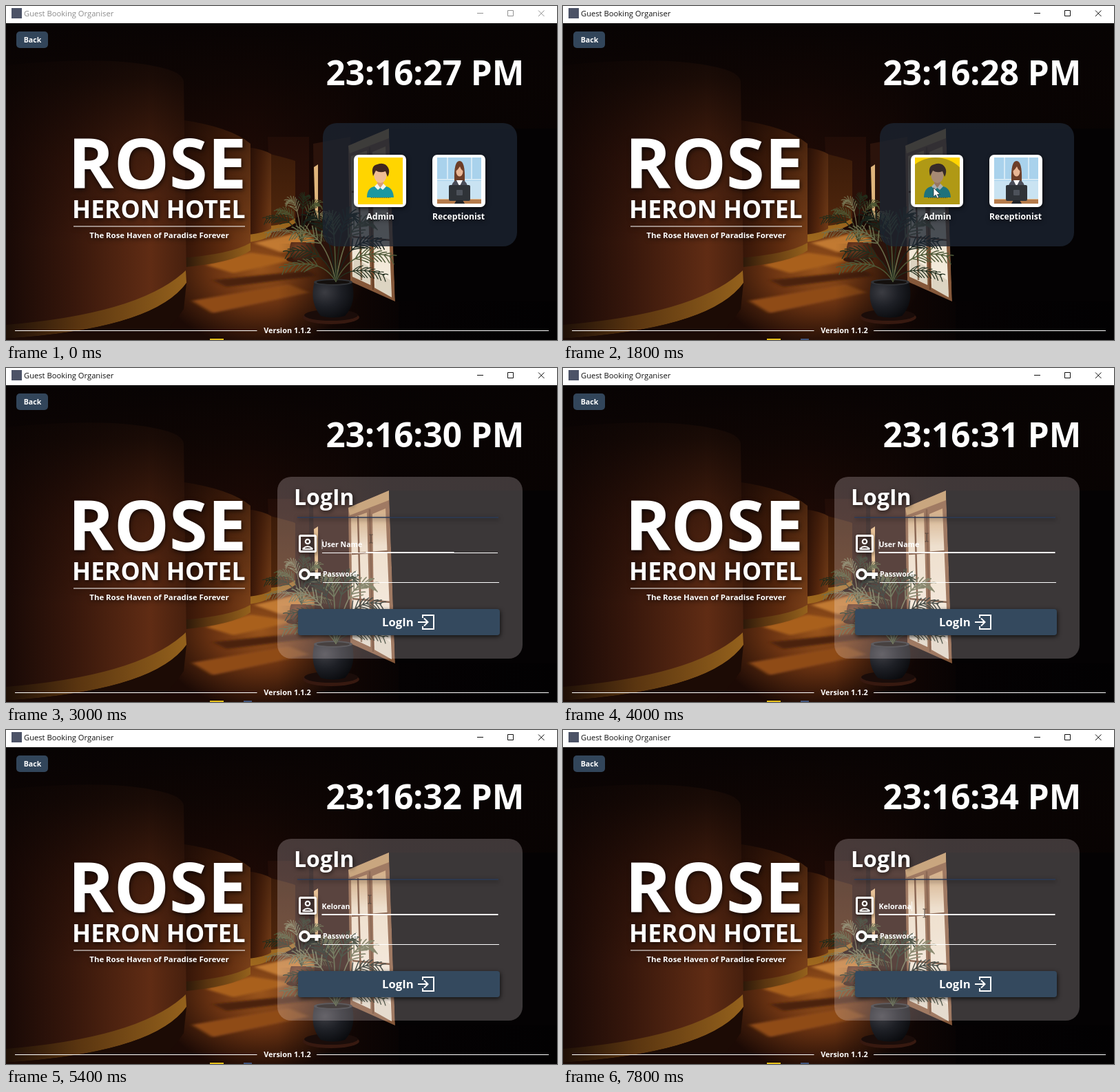
Recreate the animation shown at these times as an HTML page. Size 800 by 485 pixels, loop 8000 ms.

```html
<!DOCTYPE html>
<html lang="en">
<head>
<meta charset="utf-8">
<title>Guest Booking Organiser</title>
<style>
  html, body { margin: 0; width: 100%; height: 100%; overflow: hidden; background: #050203; }
  svg { display: block; width: 100vw; height: 100vh; }
  text { font-family: "Open Sans", "Noto Sans", sans-serif; font-weight: 700; fill: #fff; white-space: pre; }
  .mid { text-anchor: middle; }
  .drop { filter: drop-shadow(1px 2px 3px rgba(0, 0, 0, .7)); }
  .rule { stroke: #fff; fill: none; }
</style>
</head>
<body>
<svg viewBox="0 0 800 485" preserveAspectRatio="none">
  <defs>
    <linearGradient id="room" x2="1" y2="0">
      <stop offset="0" stop-color="#0e0504"/><stop offset=".45" stop-color="#240c06"/>
      <stop offset=".6" stop-color="#160805"/><stop offset=".7" stop-color="#050203"/><stop offset="1" stop-color="#020102"/>
    </linearGradient>
    <linearGradient id="drum" x2="1" y2="0">
      <stop offset="0" stop-color="#180906"/><stop offset=".35" stop-color="#35160b"/>
      <stop offset=".8" stop-color="#602c14"/><stop offset="1" stop-color="#47200e"/>
    </linearGradient>
    <linearGradient id="bay" x2="1" y2="0">
      <stop offset="0" stop-color="#2f1207"/><stop offset=".6" stop-color="#5c2a0e"/><stop offset="1" stop-color="#7a4019"/>
    </linearGradient>
    <linearGradient id="band" x2="1" y2="0">
      <stop offset="0" stop-color="#1f1007"/><stop offset=".4" stop-color="#5a3510"/><stop offset="1" stop-color="#94611c"/>
    </linearGradient>
    <linearGradient id="shade" x2="0" y2="1">
      <stop offset="0" stop-color="#070303" stop-opacity=".96"/><stop offset=".2" stop-color="#0a0403" stop-opacity=".8"/>
      <stop offset=".5" stop-color="#100503" stop-opacity=".35"/><stop offset=".8" stop-color="#100503" stop-opacity="0"/>
    </linearGradient>
    <radialGradient id="glow" gradientUnits="userSpaceOnUse" cx="370" cy="380" r="155" gradientTransform="matrix(1 0 0 .75 0 95)">
      <stop offset="0" stop-color="#9a551c"/><stop offset=".45" stop-color="#6b3312"/><stop offset="1" stop-color="#1c0a05"/>
    </radialGradient>
    <linearGradient id="dusk" x2="1" y2="0">
      <stop offset="0" stop-color="#050203" stop-opacity="0"/><stop offset="1" stop-color="#050203"/>
    </linearGradient>
    <radialGradient id="pot" cx=".3" cy=".3" r=".8">
      <stop offset="0" stop-color="#3b3c42"/><stop offset=".5" stop-color="#1d1f25"/><stop offset="1" stop-color="#090a0d"/>
    </radialGradient>
    <radialGradient id="clay" cx=".35" cy=".3" r=".8">
      <stop offset="0" stop-color="#7c4425"/><stop offset="1" stop-color="#2e130b"/>
    </radialGradient>
    <linearGradient id="pane" x2="0" y2="1">
      <stop offset="0" stop-color="#c79b68"/><stop offset=".25" stop-color="#e9dac2"/><stop offset="1" stop-color="#f6efe2"/>
    </linearGradient>
    <filter id="soft" x="-20%" y="-80%" width="140%" height="260%"><feGaussianBlur stdDeviation="3 1.500"/></filter>
    <clipPath id="face"><rect x="511" y="220" width="65" height="68"/></clipPath>
  </defs>

  <g id="photo">
    <rect y="25" width="800" height="460" fill="url(#room)"/>
    <path d="M240 325H470L570 430V485H60Z" fill="url(#glow)"/>
    <g filter="url(#soft)">
      <path d="M360 344L428 328L452 342L400 358Z" fill="#c27a30"/>
      <path d="M290 376L355 358L420 368L330 388Z" fill="#a9601f"/>
      <path d="M270 428L410 404L440 416L300 446Z" fill="#8f4c19"/>
      <path d="M300 398L440 384L450 392L320 408Z" fill="#4b210c"/>
    </g>
    <path d="M380 190H440V300L385 322Z" fill="#32130a"/>
    <path d="M384 215Q412 222 420 225V308Q405 318 384 319Z" fill="#55290d"/>
    <path d="M384 319Q407 317 420 308V315Q405 326 384 328Z" fill="#a56d20"/>
    <path d="M350 205Q374 208 385 215V325Q374 334 350 337Z" fill="url(#bay)"/>
    <path d="M350 332Q375 330 385 323V332Q375 341 350 343Z" fill="#a0691e"/>
    <path d="M252 165Q325 175 355 200V345Q325 364 252 370Z" fill="url(#bay)"/>
    <path d="M252 366Q325 361 355 344V355Q330 373 252 380Z" fill="url(#band)"/>
    <path d="M0 86Q160 70 235 92Q257 99 258 110L262 392Q225 455 0 474Z" fill="url(#drum)"/>
    <path d="M0 463Q195 447 261 384L262 402Q215 469 0 483Z" fill="url(#band)"/>
    <path d="M0 483Q215 469 262 402L258 440Q235 475 215 485H0Z" fill="#1c0b05"/>
    <rect y="25" width="800" height="400" fill="url(#shade)"/>
    <rect x="395" y="345" width="200" height="140" fill="url(#dusk)"/>
    <path d="M446 200L500 190V425L448 350Z" fill="#2b130b"/>
    <path d="M447 234L453 230V310L449 305Z" fill="#e0b57c"/>
    <path d="M497 203L556 178L565 429L500 400Z" fill="#85583a"/>
    <path d="M497 203L556 178V192L499 214Z" fill="#b9905d"/>
    <path d="M501 218L524 210L529 405L503 393Z" fill="url(#pane)"/>
    <path d="M532 212L551 204L560 423L535 409Z" fill="url(#pane)"/>
    <path d="M511 215L516 398M528 205L533 412M502 270L555 266M503 335L558 340" stroke="#6b4228" stroke-width="2.500" fill="none"/>
    <path d="M505 365L530 380V405L503 393ZM537 385L558 398L560 423L535 409Z" fill="#b9b096" opacity=".4"/>
    <path d="M556 178L565 429H800V178Z" fill="#040203"/>
    <ellipse cx="429" cy="368" rx="22" ry="5" fill="#35180c"/>
    <ellipse cx="472" cy="452" rx="41" ry="10" fill="#371910"/>
    <ellipse cx="472" cy="449" rx="39" ry="8" fill="#1a0c09"/>
    <path d="M414 343H443Q450 360 438 369Q428 372 418 369Q408 357 414 343Z" fill="url(#clay)"/>
    <path d="M448 400H502Q510 431 492 450Q475 455 457 450Q440 430 448 400Z" fill="url(#pot)"/>
    <ellipse cx="475" cy="401" rx="28" ry="5" fill="#303236"/>
    <ellipse cx="475" cy="401" rx="24" ry="3" fill="#130f0d"/>
    <g id="plants" fill="none" stroke-linecap="round"></g>
  </g>

  <g id="frame">
    <rect width="800" height="25" fill="#fff"/>
    <rect x="8" y="3" width="15" height="15" fill="#4c5367"/>
    <text id="title" x="26" y="15" font-size="11.200" style="font-weight:400">Guest Booking Organiser</text>
    <path id="controls" d="M684 10.500H693M728.500 6.500H736.500V14.500H728.500ZM773 6.500L781.500 15M781.500 6.500L773 15" fill="none"/>
    <rect x="296" y="483" width="20" height="2" fill="#e3bd19"/>
    <rect id="task" x="345" y="483" width="12" height="2" fill="#40537a"/>
  </g>

  <g id="brand" class="drop">
    <text x="90" y="265" font-size="101">ROSE</text>
    <text x="96" y="308" font-size="35.500">HERON HOTEL</text>
    <path class="rule" d="M98 320H347"/>
    <text class="mid" x="222.500" y="337" font-size="11.400">The Rose Haven of Paradise Forever</text>
  </g>
  <path class="rule" d="M13 471.500H364.500M451 471.500H788"/>
  <text class="mid" x="408.500" y="475" font-size="10.900">Version 1.1.2</text>
  <rect id="back" x="15" y="37" width="46" height="24" rx="5"/>
  <text class="mid" x="38.500" y="53" font-size="10.600">Back</text>
  <text id="clock" x="464.500" y="115" font-size="49.400"></text>

  <g id="choose">
    <rect x="460" y="170" width="282" height="179" rx="20" fill="#1c2531" fill-opacity=".78"/>
    <g class="drop">
      <rect x="505" y="216" width="76" height="76" rx="7" fill="#fff"/>
      <rect x="619" y="216" width="77" height="76" rx="7" fill="#fff"/>
    </g>
    <g clip-path="url(#face)">
      <rect x="511" y="220" width="65" height="68" fill="#ffd500"/>
      <path d="M524 278Q524 264 535 262L543 260L552 262Q562 264 563 278Z" fill="#1c98a0"/>
      <path d="M539 253H548V261Q543 267 539 261Z" fill="#d99d76"/>
      <path d="M535 262L539 258L543.500 264L548 258L552 262L547 267L543.500 264L540 267Z" fill="#f2f4f2"/>
      <ellipse cx="543.500" cy="246" rx="9" ry="11" fill="#efbd95"/>
      <path d="M533 247Q529 232 539 230Q550 226 555 235Q558 241 554 248L551 240Q543 243 537 239Z" fill="#40271e"/>
      <path d="M530 278.500H558" stroke="#836f18" stroke-dasharray="2 1"/>
      <circle id="ripple" cx="541" cy="270" fill="#26303a" fill-opacity=".36"/>
    </g>
    <rect x="626" y="220" width="64" height="67" fill="#a9d2ec"/>
    <path d="M626 254H690V280H626Z" fill="#c9e3f2"/>
    <path d="M626 252H690M641 220V252M676 220V252" stroke="#d5eaf6" stroke-width="2"/>
    <path d="M651 254Q650 225 658.500 225Q667 225 666 254Z" fill="#6d3e28"/>
    <path d="M645 280Q644 257 653 253H664Q673 257 672 280Z" fill="#4a4d58"/>
    <path d="M654 253H663L658.500 262Z" fill="#fff"/>
    <ellipse cx="658.500" cy="240" rx="5" ry="7.500" fill="#e9b694"/>
    <path d="M653 240Q654 229 660 230Q664 232 664 240Q660 237 659 233Q656 238 653 240Z" fill="#6d3e28"/>
    <path d="M626 281H690V287H626Z" fill="#b57b4b"/>
    <path d="M626 280.500H690" stroke="#e4c29b"/>
    <rect x="643" y="260" width="31" height="23" rx="2" fill="#2f3338"/>
    <path d="M654 282H663L666 287H651Z" fill="#24272c"/>
    <rect x="654" y="267" width="9" height="8" rx="1" fill="#4d525a"/>
    <g class="drop">
      <text class="mid" x="543.500" y="310" font-size="12.400">Admin</text>
      <text class="mid" x="657" y="310" font-size="12.200">Receptionist</text>
    </g>
  </g>

  <g id="login">
    <rect x="394" y="158" width="356" height="264" rx="20" fill="#fff0f4" fill-opacity=".22"/>
    <text class="drop" x="418" y="199" font-size="32">LogIn</text>
    <path class="drop" d="M423 217H715" stroke="#2b3b58" stroke-width="1.500"/>
    <g class="drop" fill="none" stroke="#fff">
      <rect x="426.500" y="243.500" width="23" height="23" rx="1.500" stroke-width="3"/>
      <circle cx="438" cy="252" r="3.200" stroke-width="2.200"/>
      <path d="M431.500 263V262Q438 256.500 444.500 262V263Z" stroke-width="2"/>
      <circle cx="433.500" cy="299.500" r="6.500" stroke-width="4"/>
      <path d="M441 299.500H457M451 299V306" stroke-width="5"/>
    </g>
    <path class="rule" d="M459 268.500H714M460 311.500H716"/>
    <path id="focus" class="rule" stroke-width="2"/>
    <text id="user" x="458.500" y="260" font-size="10.600"></text>
    <text x="460" y="303" font-size="10.500">Password</text>
    <rect id="caret" y="249" width="1" height="14" fill="#fff" fill-opacity=".8"/>
    <rect class="drop" x="424" y="350" width="293" height="38" rx="4" fill="#34495e"/>
    <text x="546" y="375" font-size="16.700">LogIn</text>
    <path d="M598 369H612M607 363.500L612.500 369L607 374.500M605 363V359H621V379H605V375" fill="none" stroke="#fff" stroke-width="2"/>
  </g>

  <path id="arrow" d="M0 0V13L3.200 10.200L5.400 15L7.600 14L5.500 9.500H9.500Z" fill="#fff" stroke="#222" stroke-width=".7"/>
  <path id="beam" d="M-2.500 -6H-.6L0 -5.400L.6 -6H2.500M0 -5.400V5.400M-2.500 6H-.6L0 5.400L.6 6H2.500" fill="none" stroke="#4c4039"/>
</svg>

<script>
const $ = id => document.getElementById(id);
const LOOP = 8000, STEP = 200, USER = "Kelorana";

let seed = 7;
const rand = () => (seed = seed * 16807 % 2147483647) / 2147483647;

// One palm leaf: a bent stem with drooping leaflets on both sides.
function frond(x, y, angle, len, color) {
  const dx = Math.cos(angle), dy = Math.sin(angle);
  const cx = x + dx * len * .3, cy = y + dy * len * .75 - len * .18;
  const ex = x + dx * len, ey = y + dy * len + len * .12;
  const mix = (a, b, c, t) => (1 - t) * (1 - t) * a + 2 * t * (1 - t) * b + t * t * c;
  let d = `M${x} ${y}Q${cx} ${cy} ${ex} ${ey}`;
  for (let t = .45; t < 1; t += .075) {
    const px = mix(x, cx, ex, t), py = mix(y, cy, ey, t);
    const heading = Math.atan2((1 - t) * (cy - y) + t * (ey - cy), (1 - t) * (cx - x) + t * (ex - cx));
    for (const side of [-1, 1]) {
      const a = heading + side * (.5 + rand() * .25), l = len * (.28 - .17 * t);
      d += `M${px} ${py}q${Math.cos(a) * l * .6} ${Math.sin(a) * l * .6} ${Math.cos(a) * l} ${Math.sin(a) * l + 3}`;
    }
  }
  return `<path d="${d}" stroke="${color}" stroke-width="${len / 80 + .3}"/>`;
}

// Leaves fan out from left to right, the upright ones longest.
function palm(x, y, size, count, colors) {
  let out = "";
  for (let i = 0; i < count; i++) {
    const a = -Math.PI * (.08 + .8 * i / (count - 1));
    out += frond(x, y, a, size * (.5 + .45 * Math.sin(-a) + rand() * .15), colors[i % colors.length]);
  }
  return out;
}
$("plants").innerHTML =
  palm(429, 343, 72, 9, ["#4d5632", "#222c1a", "#757250"]) +
  palm(479, 400, 108, 10, ["#232f1e", "#4f5a38", "#18221a", "#686c4a"]);

// [time, value] pairs held until the next one
const ticks = [1000, 2000, 3000, 4000, 5000, 5800, 6800];
const typed = [[4200, 2], [4800, 3], [5000, 4], [5200, 5], [5400, 7], [5600, 8]];
const blinks = [[3000, 1], [4200, 0], [6200, 1], [6800, 0], [7200, 1], [7600, 0], [7800, 1]];
const path = [[200, 350, 475], [600, 478, 345], [1000, 538, 264], [2400, 538, 264], [2800, 532, 250],
  [3200, 528, 246], [6400, 528, 246], [6600, 518, 249], [7000, 512, 260], [7600, 525, 266]];

const held = (list, t) => list.reduce((v, [at, x]) => t >= at ? x : v, 0);

function along(t) {
  const i = path.findIndex(p => p[0] > t);
  if (i < 0) return path[path.length - 1].slice(1);
  if (i === 0) return path[0].slice(1);
  const [a, x, y] = path[i - 1], [b, u, v] = path[i], k = (t - a) / (b - a);
  return [x + (u - x) * k, y + (v - y) * k];
}

const show = (id, on) => $(id).style.display = on ? "" : "none";

function draw(t) {
  const active = t >= 1600, login = t >= 2000, focused = t >= 3000;

  $("clock").textContent = `23:16:${27 + ticks.filter(k => t >= k).length} PM`;
  $("title").style.fill = active ? "#111" : "#8b8b8b";
  $("controls").setAttribute("stroke", active ? "#111" : "#929292");
  $("back").setAttribute("fill", login && !focused ? "#465568" : "#32455a");
  show("task", t >= 200);
  show("choose", !login);
  show("login", login);
  $("ripple").setAttribute("r", t < 1600 ? 0 : t < 1800 ? 24 : 50);

  const half = 128 * Math.max(0, Math.min(1, (t - 2800) / 400));
  $("focus").setAttribute("d", `M${586.5 - half} 268H${586.5 + half}`);
  show("focus", half > 0);

  const n = held(typed, t);
  $("user").textContent = n ? USER.slice(0, n) : "User Name";
  show("caret", held(blinks, t));
  $("caret").setAttribute("x", n ? 458.5 + $("user").getComputedTextLength() : 458.5);

  const [x, y] = along(t);
  for (const id of ["arrow", "beam"]) $(id).setAttribute("transform", `translate(${x} ${y})`);
  show("arrow", t >= 200 && t < 2800);
  show("beam", t >= 2800);
}

const start = performance.now();
let shown = -1;
function loop() {
  const t = Math.floor((performance.now() - start) % LOOP / STEP) * STEP;
  if (t !== shown) draw(shown = t);
  requestAnimationFrame(loop);
}
loop();
</script>
</body>
</html>
```
